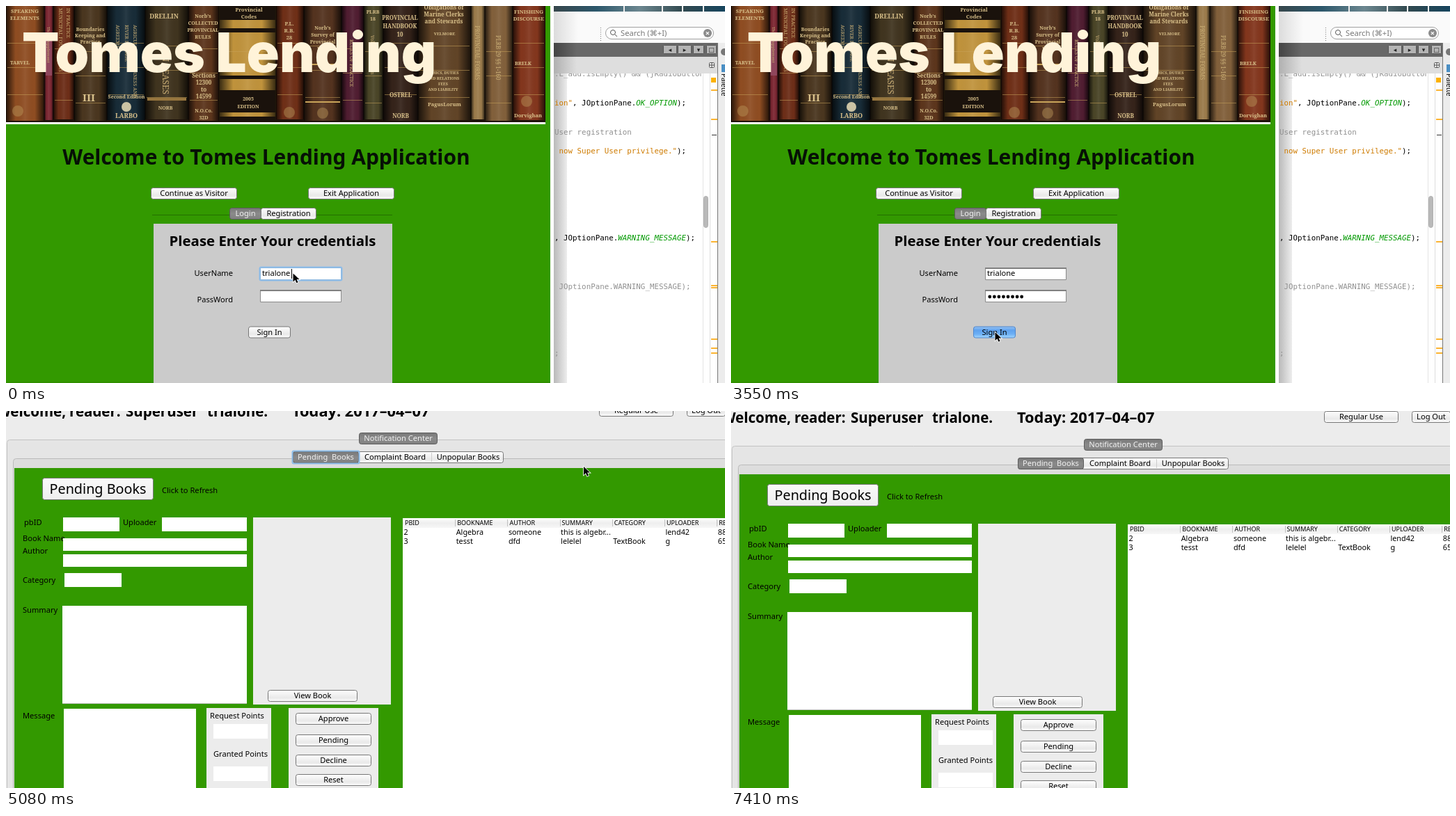
Recreate the animation shown at these times as an HTML page with a canvas. Size 1033x542 px, loop 8 s.

```html
<!DOCTYPE html>
<html lang="en">
<head>
<meta charset="utf-8">
<title>Lending application</title>
<style>
  html, body { margin: 0; width: 100%; height: 100%; overflow: hidden; background: #339900; }
  canvas { display: block; }
</style>
</head>
<body>
<canvas id="stage" width="1033" height="542"></canvas>
<script>
const ctx = document.getElementById('stage').getContext('2d');
const W = 1033, H = 542, LOOP = 8000;
const GREEN = '#339900', ORANGE = '#ce7b00', GOLD = '#c9a45a';
const SANS = '"Noto Sans", sans-serif', SERIF = '"Noto Serif", serif', MONO = '"DejaVu Sans Mono", monospace';
const UI = '11.1px ' + SANS;

const rect = (x, y, w, h, color) => { ctx.fillStyle = color; ctx.fillRect(x, y, w, h); };

function text(str, x, y, { font = UI, color = '#000', align = 'left' } = {}) {
  ctx.font = font;
  ctx.fillStyle = color;
  ctx.textAlign = align;
  ctx.fillText(str, x, y);
}

function gradient(x0, y0, x1, y1, ...colors) {
  const g = ctx.createLinearGradient(x0, y0, x1, y1);
  colors.forEach((c, i) => g.addColorStop(i / (colors.length - 1), c));
  return g;
}

function rounded(x, y, w, h, r, fill, stroke, line = 1) {
  ctx.beginPath();
  ctx.roundRect(x + .5, y + .5, w - 1, h - 1, r);
  ctx.fillStyle = fill;
  ctx.fill();
  ctx.strokeStyle = stroke;
  ctx.lineWidth = line;
  ctx.stroke();
}

function disc(x, y, r, color) {
  ctx.beginPath();
  ctx.arc(x, y, r, 0, 7);
  ctx.fillStyle = color;
  ctx.fill();
}

function button(label, x, y, w, h = 17, { colors = ['#fff', '#f4f4f4', '#e9e9e9', '#fff'], border = '#777', color, font } = {}) {
  rounded(x, y, w, h, 3, gradient(0, y, 0, y + h, ...colors), border);
  const size = parseFloat(font || UI);
  text(label, x + w / 2, y + h / 2 + size * .36, { align: 'center', color, font });
}

const darkTab = { colors: ['#777', '#8a8a8a', '#808080'], border: '#5c5c5c', color: '#f0f0f0' };

function focusRing(x, y, w, h) {
  rounded(x - 1, y - 1, w + 2, h + 2, 2, 'transparent', '#8dbdea', 2);
}

function field(x, y, w, h, focused) {
  if (focused) focusRing(x, y, w, h);
  rounded(x, y, w, h, 0, '#fff', focused ? '#8fb8df' : '#8a8a8a');
  if (!focused) rect(x, y, w, 2, '#808080');
}

// ---- Book shelf ----
const books = [
  [0, 55, '#8f4d22'], [55, 13, '#7d2833'], [68, 30, '#6d2e18'], [98, 47, '#4a361f'], [145, 55, '#182c38'],
  [200, 62, '#40341f'], [262, 44, '#5c351c'], [306, 82, '#c0933c'], [388, 40, '#6f2f17'], [428, 54, '#54331f'],
  [482, 32, '#501d31'], [514, 28, '#4a4527'], [542, 50, '#35231a'], [592, 76, '#614427'], [668, 20, '#9c7c4c'],
  [688, 40, '#82603b'], [728, 47, '#83361d']
];
// center x, first baseline, line height, font size, lines
const labels = [
  [27, 10, 10, 7.5, 'SPEAKING', 'ELEMENTS'], [20, 84, 9, 7, 'TARVEL'],
  [121, 36, 9, 7, 'Boundaries', 'Keeping and', 'Practice'], [119, 137, 10, 15, 'III'],
  [173, 133, 9, 7, 'Second Edition'], [173, 161, 9, 9, 'LARBO'],
  [227, 18, 10, 9, 'DRELLIN'], [229, 149, 9, 7, 'NORB'],
  [283, 17, 10, 7, "Norb's", 'COLLECTED', 'PROVINCIAL', 'RULES'],
  [284, 103, 10, 8, 'Sections', '12300', 'to', '14599'], [284, 153, 10, 7, 'N.O.Co.', '32D'],
  [349, 8, 10, 7.5, 'Provincial', 'Codes'], [348, 136, 11, 7, '2005', 'EDITION'],
  [407, 28, 10, 7.5, 'P.L.', 'R.B.', '28', '§§'],
  [455, 34, 10, 7, "Norb's", 'Survey of', 'Provincial', 'Rule'],
  [527, 11, 10, 7, 'PLRB', '18'],
  [566, 20, 12, 8, 'PROVINCIAL', 'HANDBOOK', '10'], [567, 131, 30, 8, 'OSTREL', 'NORB'],
  [629, 5, 10, 8, 'Obligations of', 'Marine Clerks', 'and Stewards'], [630, 42, 9, 6, 'VELMORE'],
  [628, 98, 8, 5.5, 'ETHICS, DUTIES', 'AND RELATIONS', 'FEES', 'AND LIABILITY'], [630, 144, 9, 7.5, 'PagusLorum'],
  [751, 11, 10, 7.5, 'FINISHING', 'DISCOURSE'], [743, 85, 9, 7, 'BRELK'], [750, 160, 9, 7.5, 'Dorvighan']
];
// x, top, font size, string
const uprights = [
  [76, 3, 7, 'MUNICIPAL FOUNDATIONS'], [87, 3, 7, 'IN PRACTICE'],
  [183, 27, 7, 'AGRICULTURAL FAIRNESS AND'], [171, 27, 7, 'RIVER PASSAGE'], [158, 27, 7, 'AGREEMENTS'],
  [225, 62, 12, 'ON LEASES'], [494, 48, 7, 'RULES OF PRACTICE'], [524, 42, 7, 'Volume Eighteen'],
  [59, 30, 6, 'Third Supplement'], [674, 28, 8, 'PROVINCIAL FORMS'], [704, 42, 8, 'PLRB 29 §§ 1-160']
];

function upright(str, x, y, font, color) {
  ctx.save();
  ctx.translate(x, y);
  ctx.rotate(Math.PI / 2);
  text(str, 0, 0, { font, color });
  ctx.restore();
}

function shelf() {
  ctx.save();
  ctx.beginPath();
  ctx.rect(0, 0, 775, 167);
  ctx.clip();
  rect(0, 0, 775, 167, '#1c110a');
  books.forEach(([x, w, color], i) => {
    const bottom = 165 - i % 3;
    rect(x + .5, 0, w - 1, bottom, color);
    rect(x, 0, w, bottom, gradient(x, 0, x + w, 0, '#000b', '#0000', '#fff1', '#0000', '#000b'));
    if (w > 25) for (const y of [53, 88, 127]) rect(x + 2, y + i % 4 * 4, w - 4, 1, GOLD + '88');
  });
  // Black bands on the gold volume
  for (const [y, h] of [[0, 20], [32, 6], [100, 5], [121, 32], [159, 6]]) rect(307, y, 80, h, '#1a120c');
  rect(203, 132, 56, 4, '#96753e');
  rect(430, 83, 50, 2, GOLD);
  rect(430, 137, 50, 2, GOLD);
  rect(57, 45, 9, 55, '#8f465c');
  for (const [x, y] of [[17, 151], [407, 153], [455, 154], [748, 137]]) disc(x, y, 8, '#b9945877');
  disc(173, 145, 7, '#cbc3a4');
  for (const [x, y, step, size, ...lines] of labels)
    lines.forEach((s, i) => text(s, x, y + i * step, { font: `bold ${size}px ${SERIF}`, color: '#d8c08a', align: 'center' }));
  for (const [x, y, size, s] of uprights) upright(s, x, y, `${size}px ${SERIF}`, '#c9ad74');
  ctx.restore();
  text('Tomes Lending', 23, 95, { font: '900 78px Inter, sans-serif', color: '#fff3d9' });
}

// ---- Editor behind the login window ----
function code(y, ...parts) {
  let x = 788;
  for (const [str, color, style = ''] of parts) {
    text(str, x, y, { font: `${style} 10.83px ${MONO}`, color });
    x += ctx.measureText(str).width;
  }
}

function editor() {
  rect(782, 0, W - 782, H, '#fff');
  rect(787, 0, W - 787, 8, gradient(787, 0, W, 0, '#37474c', '#2d586c', '#6c8790', '#324a50', '#17455e'));
  for (const x of [887, 942, 971, 1001]) rect(x, 0, 2, 8, '#eee');
  rect(787, 8, W - 787, 45, gradient(787, 0, 822, 0, '#dcdcdc', '#fafafa'));
  for (let y = 31; y < 50; y += 3) rect(854, y, 1, 1, '#777');
  rounded(861, 30, 156, 18, 9, '#fff', '#a0a0a0');
  ctx.beginPath();
  ctx.arc(872, 38, 3.5, 0, 7);
  ctx.moveTo(874.5, 40.5);
  ctx.lineTo(878, 44);
  ctx.strokeStyle = '#555';
  ctx.stroke();
  text('Search (⌘+I)', 883, 43, { font: '11.2px ' + SANS, color: '#777' });
  disc(1008, 39, 6, '#8b8b8b');
  text('×', 1008, 43, { color: '#fff', align: 'center', font: 'bold 11px ' + SANS });

  rect(787, 53, 236, 20, gradient(787, 0, 820, 0, '#444', '#686868'));
  for (const [x, w, mark] of [[944, 20, '◂'], [965, 20, '▸'], [987, 16, '▾'], [1006, 15, '□']]) {
    rounded(x, 56, w, 13, 1, '#b4b4b4', '#555');
    text(mark, x + w / 2, 66, { align: 'center', font: '9px "DejaVu Sans", sans-serif', color: '#222' });
  }
  rect(787, 73, 236, 24, gradient(787, 0, 820, 0, '#b0b0b0', '#dedede'));
  rounded(1010, 81, 8, 8, 1, '#eee', '#555');
  rect(1013.5, 81, 1, 8, '#555');
  rect(1010, 84.5, 8, 1, '#555');

  rect(787, 97, 19, 445, gradient(787, 0, 806, 0, '#b9b9b9', '#ededed'));
  const gray = '#909090', green = '#009900';
  ctx.save();
  ctx.beginPath();
  ctx.rect(787, 97, 214, 445);
  ctx.clip();
  code(101, [':E_add.isEmpty() && (jRadioButton', gray]);
  code(143, ['ion"', ORANGE], [', JOptionPane.', '#000'], ['OK_OPTION', green, 'italic'], [');', '#000']);
  code(185, ['User registration', gray]);
  code(212, [' now Super User privilege."', ORANGE], [');', '#000']);
  code(337, [', JOptionPane.', '#000'], ['WARNING_MESSAGE', green, 'italic'], [');', '#000']);
  code(407, [' JOptionPane.WARNING_MESSAGE);', gray]);
  code(503, [';', gray]);
  ctx.restore();

  rect(1001, 97, 1, 445, '#e4e4e4');
  rounded(1002, 273, 7, 46, 3, '#b9b9b9', '#b0b0b0');
  rect(1011, 97, 1, 445, '#ddd');
  rect(1013, 103, 7, 7, '#fcb100');
  for (const y of [120, 162, 338, 401, 404, 478, 491, 498]) rect(1013, y, 9, 2, '#fcb432');
  rect(1014, 185, 7, 1, '#333');
  rect(1022, 53, 1, 489, '#777');
  rect(1023, 53, 10, 489, '#ececec');
  disc(1032, 66, 5, '#777');
  rect(1028, 84, 5, 11, '#4b8fc4');
  upright('Palette', 1028, 97, '10px ' + SANS, '#000');
}

// ---- Login screen ----
// time, number of dots
const typed = [[0, 0], [1040, 2], [1190, 3], [1330, 4], [1780, 6], [2080, 7], [2220, 8]];
const keyAt = (keys, t) => keys.findLast(k => k[0] <= t);

function login(t) {
  rect(0, 0, 782, H, GREEN);
  rect(0, 540, 782, 2, '#309000');
  shelf();
  rect(0, 167, 775, 3, '#fff');
  editor();
  text('Welcome to Tomes Lending Application', 374, 228, { font: 'bold 29.9px ' + SANS, color: '#061006', align: 'center' });
  button('Continue as Visitor', 208, 261, 124);
  button('Exit Application', 434, 261, 124);
  rect(210, 300, 345, 1, '#247000');
  button('Login', 321, 290, 46, 17, darkTab);
  button('Registration', 366, 290, 80);
  rect(212, 313, 343, 229, '#cbcbcb');
  text('Please Enter Your credentials', 383, 345, { font: 'bold 20.4px ' + SANS, align: 'center' });
  text('UserName', 326, 388, { align: 'right' });
  text('PassWord', 326, 426, { align: 'right' });

  const onPassword = t >= 300 && t < 3550;
  field(365, 376, 117, 18, t < 300);
  text('trialone', 368, 388);
  if (t < 300) rect(410, 378, 1, 14, '#000');

  field(365, 408, 117, 18, onPassword);
  const dots = keyAt(typed, t)[1];
  for (let i = 0; i < dots; i++) disc(371.8 + i * 6.55, 418, 2.4, '#000');
  const blinkedOff = (t >= 740 && t < 1040) || (t >= 2670 && t < 3110);
  if (onPassword && !blinkedOff) rect(Math.round(368 + dots * 6.55), 410, 1, 14, '#000');

  button('Sign In', 348, 460.5, 61, 17, t >= 3550 ? { colors: ['#9cc6f5', '#5fa2ee', '#6db0f5', '#a9dcff'], border: '#5087cc' } : {});
}

// ---- Superuser screen ----
function admin(t) {
  const dy = t < 7260 ? 0 : t < 7410 ? 5 : 9;
  const heading = { font: 'bold 20.5px ' + SANS };
  rect(0, 0, W, H, '#ececec');
  ctx.save();
  ctx.translate(0, dy);
  text('Welcome,', 86, 8, { ...heading, align: 'right' });
  text('reader:', 91, 8, heading);
  text('Superuser', 172, 8, heading);
  text('trialone.', 289, 8, heading);
  text('Today: 2017–04–07', 411, 8, { font: 'bold 21.8px ' + SANS });
  button('Regular Use', 852, -9, 107);
  button('Log Out', 978, -9, 56);

  rounded(1, 41, 1100, 600, 4, '#e5e5e5', '#c2c2c2');
  rounded(10, 68, 1100, 600, 4, '#dddddd', '#bbbbbb');
  button('Notification Center', 507, 31, 113, 17, darkTab);
  button('', 412, 58, 303);
  rect(611, 60, 1, 13, '#ccc');
  button('Pending  Books', 412, 58, 95, 17, darkTab);
  if (t < 7260) focusRing(412, 58, 95, 17);
  text('Complaint Board', 559, 70, { align: 'center' });
  text('Unpopular Books', 664, 70, { align: 'center' });

  rect(12, 82, W, 500, GREEN);
  button('Pending Books', 52, 96, 160, 32, { font: '19.8px ' + SANS, colors: ['#fafafa', '#eee'] });
  text('Click to Refresh', 224, 118);
  const captions = [['pbID', 26, 164], ['Uploader', 168, 164], ['Book Name', 24, 187], ['Author', 24, 205],
    ['Category', 24, 247], ['Summary', 24, 290], ['Message', 24, 442]];
  for (const c of captions) text(...c);
  const panels = [[355, 153, 198, 269], [288, 427, 93, 130], [406, 427, 129, 130]];
  for (const p of panels) rect(...p, '#ececec');
  const inputs = [[82, 153, 81, 20], [224, 153, 122, 20], [82, 183, 264, 18], [82, 206, 264, 18], [84, 233, 82, 20],
    [81, 280, 265, 141], [83, 428, 190, 130], [298, 450, 78, 21], [298, 511, 78, 21]];
  for (const i of inputs) rect(...i, '#fff');
  rect(81, 420, 265, 1, '#c4c4c4');
  text('Request Points', 293, 442);
  text('Granted Points', 298, 497);
  button('View Book', 376, 401, 129);
  [['Approve', 434], ['Pending', 465], ['Decline', 494], ['Reset', 522]].forEach(([s, y]) => button(s, 416, y, 109));

  rect(570, 154, W, 400, '#fff');
  rect(570, 154, W, 14, gradient(0, 154, 0, 168, '#fff', '#eee', '#f7f7f7'));
  const table = [
    ['PBID', 'BOOKNAME', 'AUTHOR', 'SUMMARY', 'CATEGORY', 'UPLOADER', 'REQ'],
    ['2', 'Algebra', 'someone', 'this is algebr...', '', 'lend42', '88'],
    ['3', 'tesst', 'dfd', 'lelelel', 'TextBook', 'g', '65']
  ];
  table.forEach((cells, row) => cells.forEach((s, col) => {
    const x = 573 + col * 75.2;
    if (row) text(s, x - 1.5, 165 + row * 13, { font: '10.8px ' + SANS });
    else {
      text(s, x, 164, { font: '9px ' + SANS });
      if (col) rect(Math.round(x - 3), 156, 1, 10, '#c0c0c0');
    }
  }));
  ctx.restore();
}

// ---- Pointer: time, x, y ----
const moves = [
  [0, 412.5, 384.5], [2670, 411, 392], [2820, 404, 412], [2960, 393, 437], [3110, 384, 460], [3260, 379.5, 469],
  [4450, 372, 466], [4600, 362, 440], [4750, 450, 330], [4900, 640, 190], [5070, 830, 80], [5220, 930, 35], [5370, 946, 23],
  [5520, 949, 18], [5670, 930, 16], [5820, 890, 18], [5960, 860.5, 21.5],
  [6260, 850, 20], [6400, 820, 16], [6550, 790, 7], [6690, 778, -30]
];

function pointer(t) {
  const [, x, y] = keyAt(moves, t);
  ctx.save();
  ctx.translate(x, y);
  const arrow = new Path2D('M0 0V12L3 9.3 5 13.7 7 12.8 5.1 8.6H9Z');
  ctx.lineWidth = 1.6;
  ctx.strokeStyle = '#fff';
  ctx.stroke(arrow);
  ctx.fillStyle = '#000';
  ctx.fill(arrow);
  ctx.restore();
}

function draw() {
  const t = performance.now() % LOOP;
  if (t < 3850) login(t);
  else if (t < 4000) {
    rect(0, 0, W, H, GREEN);
    rect(0, 538, W, 4, '#309000');
  } else admin(t);
  pointer(t);
  requestAnimationFrame(draw);
}
draw();
</script>
</body>
</html>
```
